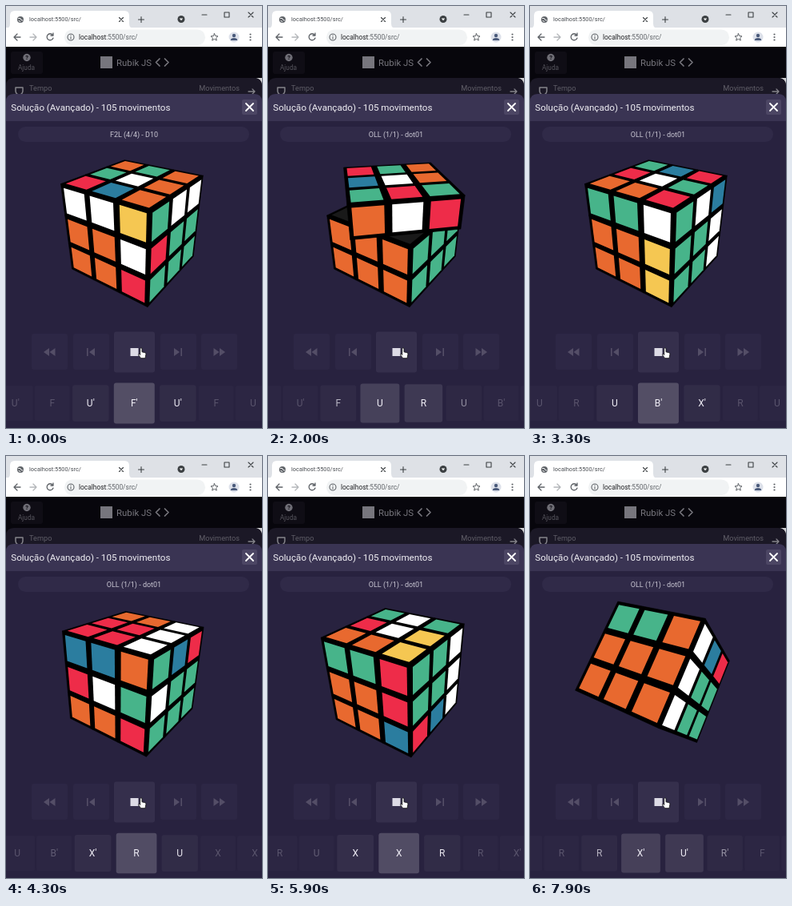
Recreate the animation shown at these times as an HTML page. Size 320 by 528 pixels, loop 8 s.

```html
<!DOCTYPE html>
<html lang="pt">
<head>
<meta charset="utf-8">
<title>Cubo</title>
<style>
  html, body { margin: 0; width: 100%; height: 100%; overflow: hidden; background: #28223f; }
  svg { display: block; width: 100vw; height: 100vh; font-family: Roboto, Arial, sans-serif; }
  .mid { text-anchor: middle; }
  .line { fill: none; stroke-linecap: round; stroke-linejoin: round; }
</style>
</head>
<body>
<svg viewBox="0 0 320 528">
  <!-- browser window -->
  <rect width="320" height="28" fill="#dee1e6"/>
  <path d="M0 28Q5 28 5 22V12Q5 6 11 6H148Q154 6 154 12V22Q154 28 160 28Z" fill="#fff"/>
  <circle cx="18" cy="17" r="4" fill="#5f6368"/>
  <path class="line" d="M15.500 15.500h2.500l1 2 2 .5M16 18.500l2 1" stroke="#fff" stroke-width=".900"/>
  <text x="29" y="19.300" font-size="7.400" fill="#4b4f54">localhost:5500/src/</text>
  <g class="line" stroke="#3c4043" stroke-width="1.100">
    <path d="M141.500 14.500l5 5m0-5l-5 5"/>
    <path d="M165.500 17h7m-3.500-3.500v7M245 11h6M273 8h6v6h-6zM303 8l6 6m0-6l-6 6"/>
  </g>
  <circle cx="219" cy="16.500" r="4.500" fill="#3c4043"/>
  <path d="M216.800 15.500h4.400l-2.200 2.800z" fill="#fff"/>
  <rect y="27" width="320" height="25" fill="#fff"/>
  <rect x="73" y="29.500" width="176" height="19.500" rx="9.750" fill="#f1f3f4"/>
  <g class="line" stroke="#5f6368" stroke-width="1.300">
    <path d="M18 39h-8m4-4l-4 4 4 4"/>
    <path d="M30 39h8m-4-4l4 4-4 4" stroke="#b4b7ba"/>
    <path d="M58.500 36.500a4 4 0 1 0 .500 3.500M59 34v3h-3"/>
    <circle cx="81" cy="39" r="4" stroke-width="1.100"/><path d="M81 38.800v2.200M81 36.800v.1" stroke-width="1.100"/>
    <path d="M260.500 34.500l1.300 3 3.200.300-2.400 2.100.700 3.200-2.800-1.700-2.800 1.700.700-3.200-2.400-2.100 3.200-.300z" stroke-width="1"/>
  </g>
  <circle cx="285" cy="39" r="6.500" fill="#dde1ea"/>
  <g fill="#4a5a7a"><circle cx="285" cy="37" r="2.200"/><path d="M280.800 43q0-3 4.200-3t4.200 3z"/></g>
  <g fill="#5f6368"><circle cx="305.500" cy="35.500" r="1.100"/><circle cx="305.500" cy="39" r="1.100"/><circle cx="305.500" cy="42.500" r="1.100"/></g>
  <text x="91" y="42" font-size="8.400" fill="#5f6368"><tspan fill="#202124">localhost</tspan>:5500/src/</text>

  <!-- dimmed page -->
  <rect y="51" width="320" height="70" fill="#07060c"/>
  <path d="M312 90H320V99Q319 91 312 90Z" fill="#cfcfd2"/>
  <rect x="6" y="57" width="40" height="28" rx="3" fill="#0f0d15"/>
  <circle cx="26" cy="64.500" r="4.700" fill="#6f6e76"/>
  <text class="mid" x="26" y="67.300" font-size="7.500" font-weight="700" fill="#0f0d15">?</text>
  <text class="mid" x="25.500" y="80" font-size="8.300" fill="#56555d">Ajuda</text>
  <rect x="118" y="63" width="15" height="15" fill="#77767d"/>
  <text x="138" y="74.700" font-size="11.400" fill="#77767d">Rubik JS</text>
  <path class="line" d="M192 66l-4.500 4.500 4.500 4.500M198.500 66l4.500 4.500-4.500 4.500" stroke="#77767d" stroke-width="1.700"/>
  <path d="M0 121V100Q0 90 10 90H310Q320 90 320 100V121Z" fill="#1b1826"/>
  <path class="line" d="M12 102h9v4q0 4-4.500 5.500Q12 110 12 106z" stroke="#85848b" stroke-width="1.500"/>
  <g font-size="9.200" fill="#5f5d67"><text x="29" y="105.700">Tempo</text><text x="292" y="105.700" text-anchor="end">Movimentos</text></g>
  <path class="line" d="M303 107h8m-3-3l3 3-3 3" stroke="#85848b" stroke-width="1.300"/>

  <!-- dialog -->
  <path d="M0 528V120Q0 110 10 110H310Q320 110 320 120V528Z" fill="#28223f"/>
  <path d="M0 144V120Q0 110 10 110H310Q320 110 320 120V144Z" fill="#3a3453"/>
  <text x="6.300" y="130.500" font-size="11.600" fill="#f1f0f5">Solução (Avançado) - 105 movimentos</text>
  <rect x="295" y="117" width="19" height="19" rx="2" fill="#4c4664"/>
  <path class="line" d="M300 122l9 9m0-9l-9 9" stroke="#fff" stroke-width="1.800"/>
  <rect x="15" y="151" width="289" height="19" rx="9.500" fill="#302a48"/>
  <text id="stage" class="mid" x="160" y="163.700" font-size="9" fill="#c9c7d3"></text>

  <g id="cube"></g>

  <!-- player -->
  <g fill="#2d2745">
    <rect x="32" y="410" width="45" height="45" rx="3"/><rect x="84" y="410" width="45" height="45" rx="3"/>
    <rect x="193" y="410" width="45" height="45" rx="3"/><rect x="244" y="410" width="45" height="45" rx="3"/>
    <rect x="135" y="407.500" width="51" height="51" rx="3" fill="#352f4c"/>
  </g>
  <g fill="#544e67">
    <path d="M54 428v10l-7-5zM61.500 428v10l-7-5zM101 428h1.600v10h-1.600zM111 428v10l-7-5z"/>
    <path d="M210 428v10l7-5zM218.400 428h1.600v10h-1.600zM259.500 428v10l7-5zM267 428v10l7-5z"/>
  </g>
  <rect x="155.500" y="428" width="10" height="10" fill="#dddbe5"/>

  <g id="strip" class="mid" font-size="12"></g>

  <path transform="translate(170 435.500) scale(1.15) translate(-170.500 -435.500)" d="M168.500 430q0-1.300 1-1.300t1 1.300v3.200l3.300.8q1.200.4 1 1.600l-.8 4.400h-4.600l-2.700-3.500q-.5-1.100.7-1l1.100.9z" fill="#fff" stroke="#111" stroke-width=".700"/>
</svg>

<script>
const LOOP = 8000, PERIOD = 535.9, TURN = 500, STRIP_LAG = 21;
const FIRST = 3, ANCHOR = { move: 6, start: 1753 };
const SEQUENCE = "U' F U' F' U' F U R U B' X' R U X X R R X' U' R' F R F'".split(" ");
const PAINT = { W: "#fff", Y: "#f5c752", O: "#e8692f", R: "#ee2c49", G: "#47b48a", B: "#2b7d9f", inner: "#191919" };

// axis, layer (0 = whole cube), clockwise sign
const TURNS = { U: [1, 1, -1], F: [2, 1, -1], R: [0, 1, -1], B: [2, -1, 1], X: [0, 0, -1] };
const parseMove = name => {
  const [axis, layer, sign] = TURNS[name[0]];
  return { axis, layer, angle: (name[1] ? -sign : sign) * Math.PI / 2 };
};

const clamp01 = v => Math.min(1, Math.max(0, v));
const dot = (a, b) => a[0] * b[0] + a[1] * b[1] + a[2] * b[2];
const add = (a, b, k = 1) => a.map((v, i) => v + b[i] * k);
const rotate = (v, axis, angle) => {
  const j = (axis + 1) % 3, k = (axis + 2) % 3, c = Math.cos(angle), s = Math.sin(angle), out = [...v];
  out[j] = v[j] * c - v[k] * s;
  out[k] = v[j] * s + v[k] * c;
  return out;
};
const inLayer = (p, move) => !move.layer || p[move.axis] === move.layer;

// Two lower layers solved, top layer scrambled
function colourAt([x, y, z], [nx, ny, nz]) {
  if (ny) return ny < 0 ? "Y" : "OOGGWRRBG"[(z + 1) * 3 + x + 1];
  if (y === 1) return nz ? "W" : (nx > 0 ? "RWO" : "BWB")[z + 1];
  return nz ? (nz > 0 ? "O" : "R") : (nx > 0 ? "G" : "B");
}

function buildFaces() {
  const faces = [], range = [-1, 0, 1];
  for (const x of range) for (const y of range) for (const z of range)
    for (const axis of [0, 1, 2]) for (const side of [-1, 1]) {
      const p = [x, y, z], n = [0, 0, 0];
      n[axis] = side;
      faces.push({ p, n, colour: p[axis] === side ? colourAt(p, n) : "inner" });
    }
  return faces;
}

function applyMove(faces, name) {
  const move = parseMove(name);
  const turn = v => rotate(v, move.axis, move.angle).map(Math.round);
  return faces.map(f => inLayer(f.p, move) ? { ...f, p: turn(f.p), n: turn(f.n) } : f);
}

const states = [];
states[FIRST] = ["F'", "U", "F"].reduce(applyMove, buildFaces());
for (let i = FIRST; i < 20; i++) states[i + 1] = applyMove(states[i], SEQUENCE[i]);

// Perspective camera around the cube (half size 1)
const azimuth = 35.2 * Math.PI / 180, elevation = 28.5 * Math.PI / 180;
const [sa, ca, se, ce] = [azimuth, elevation].flatMap(a => [Math.sin(a), Math.cos(a)]);
const VIEW = [ce * sa, se, ce * ca], RIGHT = [ca, 0, -sa], UP = [-se * sa, ce, -se * ca];
const DIST = 6, FOCAL = 352, CX = 160.8, CY = 273.2, STICKER = .267;
const project = v => {
  const k = FOCAL / (DIST - dot(v, VIEW));
  return (CX + dot(v, RIGHT) * k).toFixed(2) + " " + (CY - dot(v, UP) * k).toFixed(2);
};

function drawGroup(faces, contains, turn) {
  let body = "", stickers = "";
  for (const { p, n, colour } of faces) {
    const next = add(p, n);
    const inside = next.every(v => Math.abs(v) <= 1);
    if (!contains(p) || (inside && contains(next))) continue;
    const axis = n.findIndex(Boolean), centre = add(p, n, .5).map(v => v * 2 / 3);
    const toCamera = add(VIEW.map(v => v * DIST), turn(centre), -1);
    if (dot(turn(n), toCamera) <= 0) continue;
    const quad = half => "M" + [[-1, -1], [1, -1], [1, 1], [-1, 1]].map(([a, b]) => {
      const corner = [...centre];
      corner[(axis + 1) % 3] += a * half;
      corner[(axis + 2) % 3] += b * half;
      return project(turn(corner));
    }).join("L") + "Z";
    body += quad(1 / 3);
    stickers += `<path d="${quad(STICKER)}" fill="${PAINT[colour]}"/>`;
  }
  return `<path d="${body}" stroke="#000" stroke-width=".6" stroke-linejoin="round"/>` + stickers;
}

function drawCube(index, amount) {
  const move = parseMove(SEQUENCE[index]), faces = states[index];
  const moving = drawGroup(faces, p => inLayer(p, move), v => rotate(v, move.axis, move.angle * amount));
  if (!move.layer) return moving;
  const rest = drawGroup(faces, p => !inLayer(p, move), v => v);
  return move.layer > 0 ? rest + moving : moving + rest;
}

// Keys near the middle are larger and further apart
function drawStrip(position) {
  return SEQUENCE.map((name, i) => {
    const offset = i - position, d = Math.abs(offset);
    if (d > 4) return "";
    const x = 160.3 + Math.sign(offset) * (46 * d + 8.5 * clamp01(d) + 2 * clamp01(d - 1));
    const size = 51 - 5.5 * clamp01(d) - 1.5 * clamp01(d - 1);
    const glow = .2 - .155 * clamp01(d) - .025 * clamp01(d - 1);
    const ink = 1 - .77 * clamp01(d - 1);
    return `<rect x="${x - size / 2}" y="${497 - size / 2}" width="${size}" height="${size}" rx="3" fill="#fff" fill-opacity="${glow}"/>` +
      `<text x="${x}" y="501" fill="#f0eef6" fill-opacity="${ink}">${name}</text>`;
  }).join("");
}

const ease = u => u < .5 ? 4 * u ** 3 : 1 - 4 * (1 - u) ** 3;
function progress(t) {
  const index = Math.max(FIRST, Math.floor((t - ANCHOR.start) / PERIOD) + ANCHOR.move);
  const elapsed = t - ANCHOR.start - (index - ANCHOR.move) * PERIOD;
  return { index, amount: ease(clamp01(elapsed / TURN)) };
}

const [cube, strip, stage] = ["cube", "strip", "stage"].map(id => document.getElementById(id));

function render(t) {
  const turn = progress(t), scroll = progress(t - STRIP_LAG);
  cube.innerHTML = drawCube(turn.index, turn.amount);
  strip.innerHTML = drawStrip(scroll.index + scroll.amount);
  stage.textContent = turn.index < 6 ? "F2L (4/4) - D10" : "OLL (1/1) - dot01";
}

const began = performance.now();
function tick() {
  render((performance.now() - began) % LOOP);
  requestAnimationFrame(tick);
}
tick();
</script>
</body>
</html>
```
